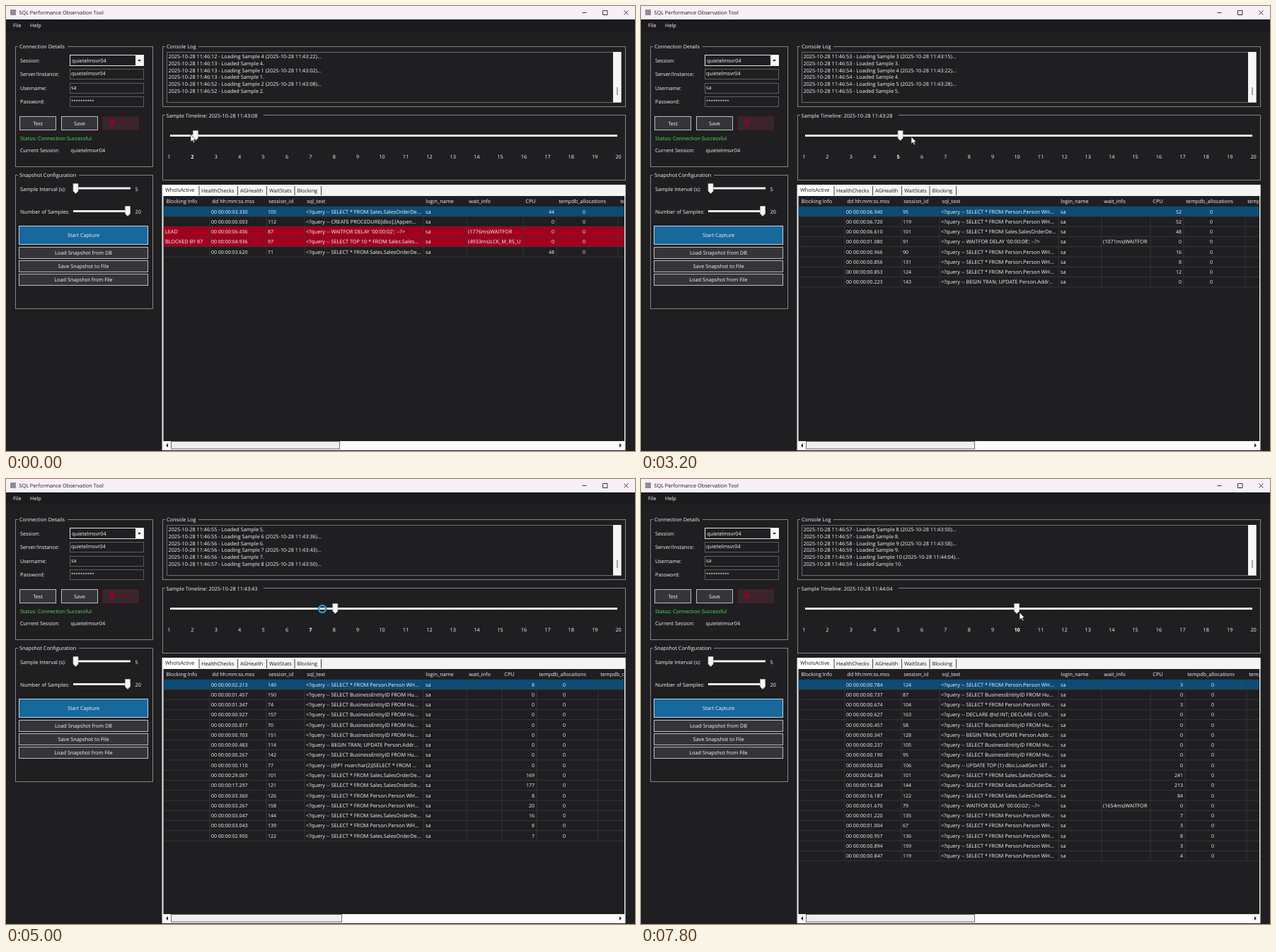
An HTML page for the animation above (8 s loop, 889 px wide and 630 px high).

```html
<!DOCTYPE html>
<html lang="en">
<head>
<meta charset="utf-8">
<title>SQL Performance Observation Tool</title>
<style>
html, body { margin: 0; width: 100%; height: 100%; overflow: hidden; background: #1f1e21; }
svg { display: block; }
text {
  font: 7.3px "Open Sans", "Noto Sans", sans-serif;
  text-rendering: geometricPrecision; white-space: pre;
}
.num { font-size: 7px; }
.stars { font-size: 5.9px; }
.on { font-weight: 700; }
</style>
</head>
<body>
<svg id="stage" width="889" height="630" viewBox="0 0 889 630"></svg>
<script>
const LOOP = 8000, STEP = 200;
const BG = '#1f1e21', LINE = '#3b3b3e', FRAME = '#858585', TEXT = '#f8f8f8', DARK = '#161616';
const stage = document.getElementById('stage');

function el(parent, tag, attrs = {}, content) {
  const node = document.createElementNS('http://www.w3.org/2000/svg', tag);
  for (const key in attrs) node.setAttribute(key, attrs[key]);
  if (content !== undefined) node.textContent = content;
  return parent.appendChild(node);
}
const group = () => el(stage, 'g');
// y is the vertical centre of the line of text
const txt = (p, x, y, s, attrs) => el(p, 'text', { x, y: y + 2.6, fill: TEXT, ...attrs }, s);
const mid = (p, x, y, s, attrs) => txt(p, x, y, s, { 'text-anchor': 'middle', ...attrs });
const box = (p, x, y, width, height, fill, stroke) =>
  el(p, 'rect', stroke
    ? { x: x + .5, y: y + .5, width: width - 1, height: height - 1, fill, stroke }
    : { x, y, width, height, fill });
const path = (p, d, fill, stroke, attrs) => el(p, 'path', { d, fill, stroke: stroke || 'none', ...attrs });

function frame(x, y, w, h, gap, title) {
  box(stage, x, y, w, h, 'none', FRAME);
  box(stage, x + 4, y - 2, gap, 5, BG);
  if (title) txt(stage, x + 6, y + .5, title);
}
function thumb(p, x, y) {
  path(p, `M${x - 3.5} ${y - 7}h7v10.5l-3.5 3.5l-3.5 -3.5z`, '#f6f6f6', '#b4b4b4', { 'stroke-width': .7 });
}
function track(x, y, w) {
  box(stage, x, y - 1.5, w, 3, '#d4d4d4');
  box(stage, x, y - .7, w, 1.7, '#fff');
}
function ticks(x, y, gap, n) {
  for (let i = 0; i < n; i++) box(stage, x + i * gap, y, 1, 2, '#0c0c0d');
}
function button(x, y, w, h, label, fill = '#353539', stroke = '#bdbdbd') {
  box(stage, x, y, w, h, fill, stroke);
  mid(stage, x + w / 2, y + h / 2, label);
}

// ---- fixed parts ----
const HOST = 'quietelmsvr04';
box(stage, 0, 0, 889, 630, BG);
box(stage, 0, 19, 889, 17, '#1b1a1c');
box(stage, 0, 0, 889, 19, '#f9eff6');
box(stage, 6, 5, 8, 8, '#8d8f94');
txt(stage, 18.5, 9.5, 'SQL Performance Observation Tool', { fill: DARK });
path(stage, 'M814.5 9.5h6M843.5 6.5h6.5v6h-6.5zM873.5 6.5l6 6m0 -6l-6 6', 'none', '#222', { 'stroke-width': .9 });
txt(stage, 10, 27, 'File');
txt(stage, 34, 27, 'Help');

frame(13, 57, 195, 171, 70, 'Connection Details');
['Session:', 'Server/Instance:', 'Username:', 'Password:'].forEach((s, i) => txt(stage, 20, 77 + i * 19.5, s));
box(stage, 90, 69, 105, 16, BG, '#e4e4e4');
box(stage, 183, 70, 11, 14, '#f6f6f6');
path(stage, 'M186 76h5l-2.5 2.7z', '#222');
txt(stage, 93, 77, HOST);
[HOST, 'sa', '**********'].forEach((s, i) => {
  const y = Math.round(89 + i * 19.5);
  box(stage, 90, y, 105, 15, BG, '#5e5e60');
  txt(stage, 92, y + 6.5, s, i === 2 ? { class: 'stars' } : {});
});
button(19, 156, 52, 20, 'Test');
button(78, 156, 52, 20, 'Save');
button(136, 156, 52, 20, '', '#34282d', '#5c1024');
box(stage, 147, 162, 6, 7, '#98001f');
box(stage, 146, 160.5, 8, 1, '#98001f');
txt(stage, 157, 165.5, 'Delete', { fill: '#8c0022' });
txt(stage, 20, 187.5, 'Status: Connection Successful', { fill: '#56e25c' });
txt(stage, 20, 204, 'Current Session:');
txt(stage, 91.5, 204, HOST);

frame(13, 239, 195, 190, 86, 'Snapshot Configuration');
txt(stage, 20, 259, 'Sample Interval (s):');
txt(stage, 20, 291.5, 'Number of Samples:');
track(95, 258, 81);
track(95, 290.5, 81);
ticks(98, 267, 10.6, 8);
ticks(98, 299, 3.85, 20);
thumb(stage, 98.5, 258.5);
thumb(stage, 172, 290.5);
txt(stage, 182.5, 259, '5');
txt(stage, 182.5, 291.5, '20');
button(18, 311, 183, 27, 'Start Capture', '#17689d', '#bcd4e4');
['Load Snapshot from DB', 'Save Snapshot to File', 'Load Snapshot from File']
  .forEach((s, i) => button(18, Math.round(340.6 + i * 19.4), 183, 17, s));

frame(221, 57, 655, 86, 47, 'Console Log');
box(stage, 227, 65, 643, 72, BG, '#6a6a6c');
box(stage, 858, 65, 11.5, 71.5, '#f5f5f5');
box(stage, 863.5, 115, 1, 11, '#555');
frame(221, 154, 655, 93, 139);
track(232, 183.5, 632);
ticks(235, 192, 32.9, 20);

box(stage, 220.5, 253, 655, 376, '#ededed');
box(stage, 222.5, 269, 651.5, 347, BG);
box(stage, 221, 253, 654.5, 16, '#f4f4f4');
box(stage, 222, 253, 50, 16, '#fff');
[['WhoIsActive', 225], ['HealthChecks', 276], ['AGHealth', 331], ['WaitStats', 372], ['Blocking', 411.5]]
  .forEach(([s, x], i) => txt(stage, x, i ? 261.5 : 260.5, s, { fill: DARK }));
[272.5, 327, 368, 407.5, 445].forEach(x => box(stage, x, 255, 1, 13, '#444'));
box(stage, 222.5, 616, 651.5, 11.5, '#fcfcfc');
path(stage, 'M229 619l-3 3l3 3zM867 619l3 3l-3 3z', '#222');

// ---- samples: seconds, session, query, cpu, wait, blocking ----
const QUERY = {
  S: 'SELECT * FROM Sales.SalesOrderDe...',
  P: 'SELECT * FROM Person.Person WH...',
  W2: "WAITFOR DELAY '00:00:02'; --?>",
  W8: "WAITFOR DELAY '00:00:08'; --?>",
  T: 'BEGIN TRAN; UPDATE Person.Addr...',
  B: 'SELECT BusinessEntityID FROM Hu...',
  N: '(@P1 nvarchar(2))SELECT * FROM ...',
  D: 'DECLARE @id INT; DECLARE c CUR...',
  C: 'CREATE PROCEDURE[dbo].[Appen...',
  K: 'SELECT TOP 10 * FROM Sales.Sales...',
  U: 'UPDATE [Person].[Address] set [Ad...',
  L: 'UPDATE TOP (1) dbo.LoadGen SET ...',
  X: 'xp_sqlagent_is_starting--?>'
};
// wait = left edge of CPU, temp = left edge of tempdb, bar = end of the scroll thumb
const sample = (stamp, wait, temp, bar, rows) =>
  ({ stamp, wait, temp, bar, rows: rows.split(',').map(r => r.trim().split(' ')) });
const S = {
  1: { stamp: '11:43:02' },
  2: sample('11:43:08', 731, 778, 471, `03.330 105 S 44,00.003 112 C 0,
    06.436 87 W2 0 (1776ms)WAITFOR LEAD,
    04.936 97 K 0 (4933ms)LCK_M_RS_U BLOCKED_BY_87,03.620 71 S 48`),
  4: sample('11:43:22', 716, 767, 463, `00.420 130 W2 0 (415ms)WAITFOR,00.170 95 P 4,
    00.060 125 T 0,01.546 61 - 1;524,00.820 119 - 0,00.710 109 - 0,00.606 101 - 0,
    00.496 140 - 0,03.210 58 P 40,03.203 136 P 36,02.986 67 P 36`),
  5: sample('11:43:28', 720, 767, 471, `06.940 95 P 52,06.720 119 P 52,06.610 101 S 48,
    01.080 91 W8 0 (1071ms)WAITFOR,00.966 90 P 16,00.856 131 P 8,00.853 124 P 12,00.223 143 T 0`),
  6: sample('11:43:36', 720, 767, 465, `01.493 133 P 8,01.376 132 P 8,01.160 131 N 0,
    00.676 58 B 0,00.626 57 B 0,00.566 93 B 0,00.520 151 D 0,00.456 129 B 0,
    00.033 152 - 0 - LEAD,14.210 101 S 96,08.680 91 W8 0,02.453 87 W2 0 (1272ms)WAITFOR,
    02.440 121 S 12,02.243 142 P 8,02.143 138 P 7,02.133 108 P 12,02.040 140 P 8,
    02.036 148 P 7,01.936 130 P 8,01.930 137 P 8,01.603 120 P 7,
    01.543 128 U 0 (1540ms)LCK_M_U BLOCKED_BY_152`),
  8: sample('11:43:50', 701, 750, 474, `02.213 140 P 8,01.457 150 B 0,01.347 74 B 0,
    00.927 157 B 0,00.817 70 B 0,00.703 151 B 0,00.483 114 T 0,00.267 142 B 0,00.110 77 N 0,
    29.067 101 S 169,17.297 121 S 177,03.360 126 P 8,03.267 158 P 20,03.047 144 S 16,
    03.043 139 P 8,02.950 122 S 7,02.937 130 P 16,02.853 97 P 8,02.323 131 P 8`),
  9: sample('11:43:58', 801, 849, 464, `35.134 101 S 197,23.364 121 S 233,09.427 126 P 40,
    09.114 144 S 72,09.110 139 P 36,09.017 122 S 36,08.390 131 P 36,00.427 97 N 0,
    00.217 130 P 32,00.020 158 P 0,00.007 73 X 7 (4ms)PREEMPTIVE_OS_GETPROCADDRESS`),
  10: sample('11:44:04', 720, 769, 471, `00.784 124 P 3,00.737 87 B 0,00.674 104 P 3,
    00.627 163 D 0,00.457 58 B 0,00.347 128 T 0,00.237 105 B 0,00.190 95 B 0,00.020 106 L 0,
    42.304 101 S 241,16.284 144 S 213,16.187 122 S 84,01.670 79 W2 0 (1654ms)WAITFOR,
    01.220 135 P 7,01.004 67 P 3,00.957 136 P 8,00.894 159 P 3,00.847 119 P 4`)
};
S[3] = { ...S[4], stamp: '11:43:15', rows: S[4].rows.slice(0, 8) };
S[7] = { ...S[8], stamp: '11:43:43', rows: S[8].rows.slice(0, 16) };

// sample, load start, load end, clock seconds of both
const LOADS = [
  [4, -9, -9, 12, 13], [1, -9, -9, 13, 13], [2, -9, -9, 52, 52],
  [3, 600, 1000, 53, 53], [4, 1400, 1800, 54, 54], [5, 2200, 2600, 54, 55],
  [6, 3400, 3800, 55, 56], [7, 4000, 4400, 56, 56], [8, 5000, 5200, 57, 57],
  [9, 6200, 6600, 58, 59], [10, 7000, 7400, 59, 59]
];
const LOG = LOADS.flatMap(([n, from, to, a, b]) => [
  [from, `2025-10-28 11:46:${a} - Loading Sample ${n} (2025-10-28 ${S[n].stamp})...`],
  [to, `2025-10-28 11:46:${b} - Loaded Sample ${n}.`]
]);
const MOUSE = [
  [0, 261, 182], [200, 272, 184], [600, 301, 184], [1200, 301, 184], [1400, 312, 183],
  [1800, 329, 183], [2200, 362, 184], [2800, 378, 185], [3000, 378, 185], [3200, 382, 185],
  [3400, 395, 184], [4200, 421, 184], [4600, 432, 184], [4800, 432, 184], [5000, 447, 184],
  [5400, 467, 186], [6000, 475, 186], [6200, 488, 186], [6600, 500, 187], [7000, 530, 188],
  [7400, 530, 188], [7800, 535, 189]
];

// ---- moving parts ----
const clip = el(el(stage, 'defs'), 'clipPath', { id: 'view' });
box(clip, 222.5, 269, 651, 347, '#000');
const log = group(), title = group(), labels = group(), grid = group(), pointer = group();
grid.setAttribute('clip-path', 'url(#view)');
const bar = box(stage, 233, 616, 238, 11.5, '#efefef', '#6b6b6b');

function drawGrid({ wait, temp, bar: end, rows }) {
  grid.replaceChildren();
  const cols = [223, 288, 368, 422, 590, 651, wait, temp, temp + 87];
  ['Blocking Info', 'dd hh:mm:ss.mss', 'session_id', 'sql_text', 'login_name', 'wait_info',
    'CPU', 'tempdb_allocations', 'tempdb_current'].forEach((s, i) => txt(grid, cols[i] + 3.3, 276.5, s));
  rows.forEach(([time, id, query, cpu, waiting = '-', block], i) => {
    const y = 283.8 + i * 14.28, c = y + 7.1;
    const fill = block ? '#a3001f' : i ? null : '#0d4c75';
    if (fill) box(grid, 222.5, y, 652, 14.28, fill);
    box(grid, 222.5, y + 13.7, 652, .8, LINE);
    cols.slice(1).forEach(x => box(grid, x - .4, y, .8, 14.28, LINE));
    const right = (x, s) => txt(grid, x, c, s, { 'text-anchor': 'end', class: 'num' });
    if (block) txt(grid, 225, c, block.replace(/_/g, ' '));
    txt(grid, 290, c, '00 00:00:' + time, { class: 'num' });
    txt(grid, 370, c, id, { class: 'num' });
    if (query !== '-') txt(grid, 424, c, '<?query -- ' + QUERY[query]);
    txt(grid, 593, c, 'sa');
    if (waiting !== '-') txt(grid, 653, c, waiting);
    right(temp - 3, cpu.replace(';', ','));
    right(temp + 41, cpu.includes(';') ? '8' : '0');
  });
  bar.setAttribute('width', end - 233);
}

function drawLabels(n) {
  labels.replaceChildren();
  for (let i = 1; i <= 20; i++)
    mid(labels, 230 + (i - 1) * 33.4 + (i > 9 ? 1 : 0), 213.5, i, i === n ? { class: 'on' } : {});
  title.replaceChildren();
  txt(title, 226.5, 155, 'Sample Timeline: 2025-10-28 ' + S[n].stamp);
}

function mouseAt(t) {
  const i = MOUSE.findIndex(k => k[0] > t);
  if (i < 0) return MOUSE[MOUSE.length - 1].slice(1);
  const [t0, x0, y0] = MOUSE[i - 1], [t1, x1, y1] = MOUSE[i], f = (t - t0) / (t1 - t0);
  return [x0 + (x1 - x0) * f, y0 + (y1 - y0) * f];
}

let shown;
function draw(t) {
  const begun = LOADS.filter(l => l[1] <= t).pop();
  const done = LOADS.filter(l => l[2] <= t).pop();
  if (done[0] !== shown) {
    shown = done[0];
    drawGrid(S[shown]);
    drawLabels(shown);
  }
  log.replaceChildren();
  LOG.filter(l => l[0] <= t).slice(-6).forEach((l, i) => txt(log, 229.5, 71.5 + i * 9.75, l[1]));

  pointer.replaceChildren();
  thumb(pointer, 235 + (begun[0] - 1) * 32.9, 183.5);
  const [x, y] = mouseAt(t);
  if (begun !== done)
    el(pointer, 'circle', { cx: x, cy: y, r: 5, fill: 'none', stroke: '#2c93d6', 'stroke-width': 2.4 });
  else
    path(pointer, `M${x} ${y}v10.3l2.4 -2.2l1.7 3.7l1.6 -.8l-1.7 -3.5h3.2z`, '#fff', '#111', { 'stroke-width': .6 });
}

let last = -1;
function tick() {
  const step = Math.floor(performance.now() % LOOP / STEP);
  if (step !== last) draw((last = step) * STEP);
  requestAnimationFrame(tick);
}
tick();
</script>
</body>
</html>
```
